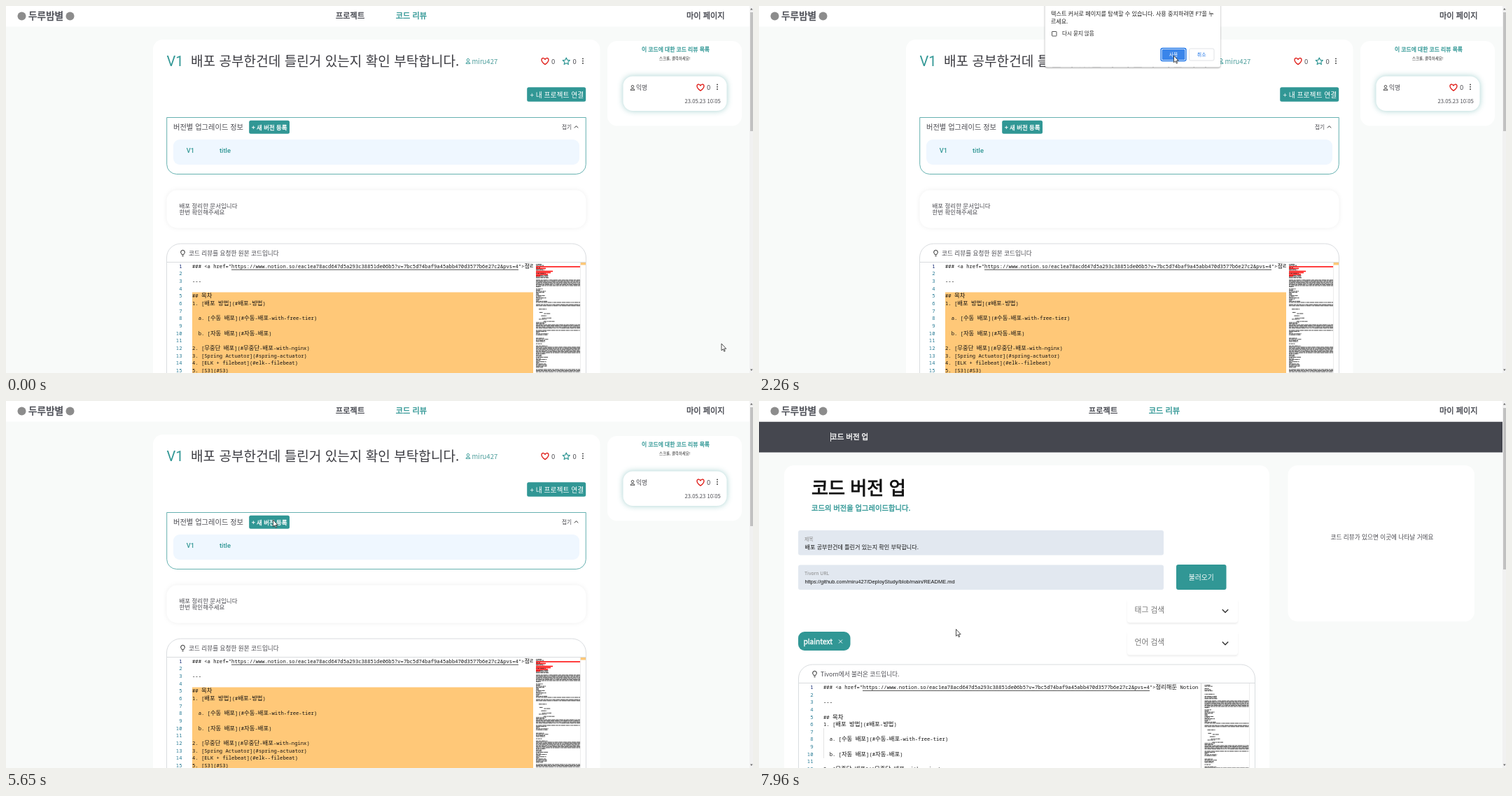
These frames come from a looping animation (1067x525 px, 8 s). An HTML page:

```html
<!DOCTYPE html>
<html lang="ko">
<head>
<meta charset="utf-8">
<style>
html, body { margin: 0; width: 100%; height: 100%; overflow: hidden; background: #f8faf9; }
svg { display: block; font-family: 'Noto Sans CJK KR', 'Noto Sans CJK', 'Noto Sans', sans-serif; }
text { white-space: pre; }
.latin { font-family: Roboto, sans-serif; }
.arial { font-family: 'Liberation Sans', sans-serif; }
.code { font-family: 'Noto Sans Mono', 'Liberation Mono', 'Noto Sans CJK KR', monospace; }
.soft { filter: drop-shadow(0 0 3px #0001); }
.drop { filter: drop-shadow(0 2px 1px #0001); }
.glow { filter: drop-shadow(0 0 4px #31979570); }
.dialog { filter: drop-shadow(0 1px 1px #0006); }
</style>
</head>
<body>
<svg id="stage" width="1067" height="525" viewBox="0 0 1067 525"></svg>
<script>
const TEAL = '#319795', DARK = '#45474f', INK = '#4a4a50', LINK_BLUE = '#1a73e8';
const TITLE = '배포 공부한건데 틀린거 있는지 확인 부탁합니다.';
const USER = 'miru427';

const text = (x, y, size, str, fill = INK, attrs = '') =>
  `<text x="${x}" y="${y}" font-size="${size}" fill="${fill}" ${attrs}>${str}</text>`;
// A thin outline gives a weight between regular and bold
const medium = (x, y, size, str, fill, attrs = '') =>
  text(x, y, size, str, fill, `stroke="${fill}" stroke-width="${size * .035}" ${attrs}`);
const rect = (x, y, w, h, r, fill, attrs = '') =>
  `<rect x="${x}" y="${y}" width="${w}" height="${h}" rx="${r}" fill="${fill}" ${attrs}/>`;
const icon = (x, y, d, color, width = 1) =>
  `<path transform="translate(${x} ${y})" d="${d}" fill="none" stroke="${color}" stroke-width="${width}" stroke-linejoin="round"/>`;

const HEART = 'M0 4.6C-7.5-.5-5-5-2.4-4.4Q-.6-4 0-2.4Q.6-4 2.4-4.4C5-5 7.5-.5 0 4.6Z';
const STAR = 'M0-5L1.5-1.7 5-1.3 2.4 1.1 3.1 4.6 0 2.8-3.1 4.6-2.4 1.1-5-1.3-1.5-1.7Z';
const PERSON = 'M0-3.6A1.8 1.8 0 0 1 0 0A1.8 1.8 0 0 1 0-3.6ZM-3 3.4Q-3 1.2 0 1.2T3 3.4Z';
const BULB = 'M-1.3 2.2C-1.3.8-2.8.5-2.8-1.4A2.8 2.8 0 0 1 2.8-1.4C2.8.5 1.3.8 1.3 2.2ZM-1 4.2H1';
const CHEVRON = 'M-4.2-2L0 2.2L4.2-2';
const dots = (x, y) => [-3.3, 0, 3.3].map(d => `<circle cx="${x}" cy="${y + d}" r=".9" fill="#333"/>`).join('');

const url = 'https://www.notion.so/eac1ea78acd647d5a293c38851de06b5?v=7bc5d74baf9a45abb470d3577b6e27c2&amp;pvs=4';
const lines = [
  `### &lt;a href="${url}"&gt;정리해둔 Notion`, '', '---', '', '## 목차',
  '1. [배포 방법](#배포-방법)', '', '  a. [수동 배포](#수동-배포-with-free-tier)', '',
  '  b. [자동 배포](#자동-배포)', '', '2. [무중단 배포](#무중단-배포-with-nginx)',
  '3. [Spring Actuator](#spring-actuator)', '4. [ELK + filebeat](#elk--filebeat)', '5. [S3](#S3)'
];
const wideHangul = s => s.replace(/[가-힣]+/g, '<tspan font-size="8.4">$&</tspan>');

function codeLines(x, y, right, clip) {
  const rows = lines.map((line, i) => {
    const base = y + i * 10.65;
    return text(x - 14.5, base, 7.2, i + 1, i ? '#237893' : '#0b216f', 'text-anchor="end"') +
      text(x, base, 7.2, wideHangul(line), '#111', `clip-path="url(#${clip})"`);
  });
  return `<clipPath id="${clip}"><rect x="0" y="0" width="${right}" height="525"/></clipPath><g class="code">${rows.join('')}</g>`;
}

// Dense full-width paragraphs alternate with short, partly indented rows
function minimap(x, y) {
  let seed = 11, d = '';
  const random = () => (seed = seed * 16807 % 2147483647) / 2147483647;
  for (let row = 1; y + row < 525; row += 1.6) {
    const wide = (row + 8) % 32 < 10;
    if (random() < (wide ? .15 : .35)) continue;
    const indent = !wide && row > 60 && row < 85 ? 4 + random() * 8 : 0;
    const end = wide ? 63 : indent + 4 + random() * 14;
    for (let at = indent; at < end;) {
      const dash = Math.min(1 + random() * 6, end - at);
      d += `M${(x + at).toFixed(1)} ${(y + row).toFixed(1)}h${dash.toFixed(1)}`;
      at += dash + .6;
    }
  }
  return `<path d="${d}" stroke="#333" stroke-width=".9"/>`;
}

const editor = (x, y, right, label) =>
  `<path d="M${x} 530V${y + 20}a20 20 0 0 1 20-20H${right - 20}a20 20 0 0 1 20 20V530M${x} ${y + 26.5}H${right}" fill="#fff" stroke="#d9dcdf"/>` +
  icon(x + 23, y + 13.5, BULB, '#222') + text(x + 31.5, y + 16.5, 8.65, label);

const scrollbar = (y, h) => rect(1062, 0, 5, 525, 0, '#f1f1f1') + rect(1063, y, 4, h, 0, '#c1c1c1') +
  '<path d="M1063 5.5l1.8-2.5 1.8 2.5zM1063 519.5l1.8 2.5 1.8-2.5z" fill="#666"/>';

const reviewPage =
  rect(210, 48, 638.5, 500, 14, '#fff') + rect(859, 50, 192, 121.5, 14, '#fff') +
  text(229.5, 86, 20, 'V1', TEAL, 'class="latin"') + text(264, 86, 19.1, TITLE, '#3c3c42', 'font-weight="300"') +
  icon(660, 79, PERSON, TEAL, .9) + text(665.5, 82.5, 9.5, USER, '#4f9f9d') +
  icon(770, 79, HEART, '#e0201b', 1.4) + text(779, 82.5, 9.5, '0') +
  icon(800.3, 79, STAR, TEAL, 1.2) + text(809.5, 82.5, 9.5, '0') + dots(824, 78.7) +
  rect(744.2, 116.2, 84, 20.6, 2.5, TEAL) + text(748.5, 130.5, 9.8, '+ 내 프로젝트 연결', '#fff') +
  '<path d="M229.7 159.5H828.3V226.5a14 14 0 0 1-14 14H243.7a14 14 0 0 1-14-14Z" fill="#fff" stroke="#55a9a7" stroke-width=".9"/>' +
  text(239, 176.6, 10.25, '버전별 업그레이드 정보') +
  rect(347.2, 163.7, 57.8, 19, 2.5, TEAL) + medium(351, 176.6, 8.45, '+ 새 버전 등록', '#fff') +
  text(794, 176, 7.7, '접기') + icon(814.5, 173, 'M-2.6 1.4L0-1.4L2.6 1.4', '#333') +
  rect(239, 191, 580, 36, 9, '#eff7ff') +
  text(257.8, 210, 9.2, 'V1', TEAL, 'class="latin" font-weight="500"') +
  text(305, 210, 9.3, 'title', TEAL, 'class="latin" font-weight="500"') +
  rect(229.5, 263.5, 599, 54, 15, '#fff', 'class="soft"') +
  text(247.5, 288.8, 8.5, '배포 정리한 문서입니다') + text(247.5, 297.8, 8.5, '한번 확인해주세요') +
  editor(229.5, 340, 828.5, '코드 리뷰를 요청한 원본 코드입니다') +
  rect(266, 409.5, 487, 120, 0, '#ffc878') + codeLines(266, 374.8, 753, 'reviewClip') +
  '<path d="M322 377.2H732" stroke="#222" stroke-width=".8"/>' +
  minimap(757, 367) +
  '<path d="M757 373H820M757 375.5H771M757 379.5H781M757 381.5H778M757 384H774M757 386H763" stroke="#f00" stroke-width="1.6"/>' +
  rect(820.5, 367, 7.5, 3.5, 0, '#ffc878') + '<path d="M820.5 367V525" stroke="#e4e4e4" stroke-width=".7"/>' +
  medium(908, 65, 7.8, '이 코드에 대한 코드 리뷰 목록', TEAL) + text(933, 77, 5.4, '스크롤, 클릭하세요!', '#222') +
  rect(881.5, 100.5, 148, 49.5, 14, '#fff', 'class="glow"') +
  icon(895, 117, PERSON, '#444', .9) + text(900, 120.2, 8.7, '익명') +
  icon(992, 116.5, HEART, '#e0201b', 1.4) + text(1001, 120, 9.5, '0') + dots(1016, 115.7) +
  text(969.5, 138.8, 7.7, '23.05.23 10:05') + scrollbar(9, 170);

const dropdown = (y, label) => rect(526, y, 158, 34, 4, '#fff', 'class="drop"') +
  text(536.5, y + 20, 10.8, label, '#777') + icon(666, y + 17.2, CHEVRON, '#333', 1.4);

const upgradePage =
  rect(0, 29.5, 1062, 44, 0, DARK) + medium(102, 54.8, 10.5, '코드 버전 업', '#fff') +
  '<path id="caret" d="M102.5 45V58" stroke="#fff" stroke-width=".9"/>' +
  rect(36, 92, 693, 460, 14, '#fff') + rect(755.5, 92, 266.5, 223.5, 14, '#fff') +
  medium(75, 134, 26.1, '코드 버전 업', '#111') +
  medium(75, 156.5, 10.3, '코드의 버전을 업그레이드합니다.', TEAL) +
  rect(56, 185, 522, 35.5, 3, '#e2e8f0') + rect(56, 234.5, 522, 35.5, 3, '#e2e8f0') +
  text(65, 203, 7.6, '제목', '#888', 'id="titleLabel"') + text(65, 253, 7.6, 'Tivorn URL', '#888', 'id="urlLabel"') +
  text(65.5, 212, 8.1, TITLE, '#111') +
  text(65.5, 260.6, 7.5, `https://github.com/${USER}/DeployStudy/blob/main/README.md`, '#111', 'class="arial"') +
  rect(596, 234, 71.5, 36, 3, TEAL) + text(613.8, 256.2, 9.8, '불러오기', '#fff') +
  dropdown(283, '태그 검색') + dropdown(329.3, '언어 검색') +
  rect(56, 330, 74.5, 27, 9, TEAL) + medium(63.5, 347.5, 10.1, 'plaintext', '#fff') +
  icon(116.5, 344, 'M-2.5-2.5L2.5 2.5M2.5-2.5L-2.5 2.5', '#fff', .9) +
  editor(56.5, 377, 708.5, 'Tivorn에서 불러온 코드입니다.') +
  '<path d="M92.5 468V511" stroke="#ddd" stroke-width=".8"/>' +
  codeLines(92, 411.9, 632, 'upgradeClip') + minimap(636.5, 404) +
  '<path id="underline" d="M148 414.4H558" stroke="#222" stroke-width=".8"/>' +
  '<path id="minimapEdge" d="M631.5 404V525" stroke="#ccc" stroke-width=".8"/>' +
  '<path d="M700.5 404V525" stroke="#e4e4e4" stroke-width=".7"/>' + rect(700, 404, 8, 11.5, 0, '#c1c1c1', 'id="slider"') +
  text(769, 112.5, 8.9, 'Loading...', INK, 'id="loading"') +
  text(816.5, 197.5, 8.65, '코드 리뷰가 있으면 이곳에 나타날 거에요', INK, 'id="empty"') +
  scrollbar(10, 231) +
  `<g id="status">${rect(-4, 513, 358, 16, 2, '#dee1e6')}${text(-1, 521.8, 7, 'rough-code.com의 응답을 기다리는 중...', '#5f6368')}</g>`;

const header = rect(0, 0, 1062, 29.5, 0, '#fff') +
  '<circle cx="22.5" cy="14.5" r="6" fill="#8c8c8c"/><circle cx="91.5" cy="14.5" r="6" fill="#8c8c8c"/>' +
  medium(32, 19.2, 13.6, '두루밤별', DARK) +
  medium(471, 18.3, 11.2, '프로젝트', DARK) + medium(556.8, 18.3, 11.2, '코드 리뷰', TEAL) +
  medium(972, 18.3, 11.2, '마이 페이지', DARK);

const dialog = rect(408.5, -10, 250.5, 97.5, 3, '#fff', 'class="dialog"') +
  text(417, 13.8, 8.1, '텍스트 커서로 페이지를 탐색할 수 있습니다. 사용 중지하려면 F7을 누', '#222') +
  text(417, 24.6, 8, '르세요.', '#222') +
  rect(418.5, 36.5, 6.5, 6.5, .5, '#fff', 'stroke="#555"') + text(433, 42.4, 7.5, '다시 묻지 않음', '#222') +
  rect(574, 60.5, 36, 18, 2.5, '#fff', `stroke="${LINK_BLUE}" stroke-width="1.3"`) +
  rect(575.5, 62, 33, 15, 1.5, LINK_BLUE, 'id="accept"') + text(585.7, 72, 6.9, '사용', '#fff') +
  rect(614.5, 61, 35.5, 17, 2, '#fff', 'id="cancel" stroke="#dadce0" stroke-width=".8"') + text(625.8, 72, 6.9, '취소', LINK_BLUE);

document.getElementById('stage').innerHTML =
  `<g id="review">${reviewPage}</g><g id="upgrade">${upgradePage}</g>${header}<g id="dialog">${dialog}</g>` +
  '<path id="cursor" d="M0 0V9.8L2.3 7.8L3.8 11.2L5.2 10.6L3.7 7.3H6.7Z" fill="#fff" stroke="#222" stroke-width=".8"/>';

// Pointer stops: time, x, y
const stops = [
  [70, 1022, 483], [730, 403, 209], [870, 357, 159], [1400, 610, 64], [1680, 630, 72], [1810, 632, 73],
  [1950, 632, 73], [2260, 592.5, 71], [2920, 592.5, 71], [3340, 625, 70], [3600, 625, 70], [3740, 604, 71],
  [3800, 604, 71], [4260, 902, 60], [4530, 902, 60], [5190, 378, 172], [5450, 378, 172], [5650, 381.5, 170],
  [6270, 381.5, 170], [6410, 374.5, 176], [6740, 374.5, 176], [7490, 276, 254], [7960, 281.5, 326.5]
];
const $ = id => document.getElementById(id);
const show = (id, on) => $(id).setAttribute('visibility', on ? 'inherit' : 'hidden');
const clamp = v => Math.max(0, Math.min(1, v));
const within = (t, a, b) => t >= a && t < b;

function pointer(t) {
  const i = stops.findIndex(s => s[0] > t);
  if (i === 0) return stops[0].slice(1);
  if (i < 0) return stops[stops.length - 1].slice(1);
  const [t0, x0, y0] = stops[i - 1], [t1, x1, y1] = stops[i];
  const u = (t - t0) / (t1 - t0), e = u * u * (3 - 2 * u);
  return [x0 + (x1 - x0) * e, y0 + (y1 - y0) * e];
}

function shrinkLabel(id, y, u) {
  $(id).setAttribute('y', y - 3.7 * u);
  $(id).setAttribute('font-size', 7.7 - .9 * u);
}

function render(t) {
  show('review', t < 5730);
  show('upgrade', t >= 5730);
  show('dialog', within(t, 400, 3800));
  $('accept').setAttribute('fill', within(t, 1500, 1740) || within(t, 2000, 2950) ? '#3a85ea' : LINK_BLUE);
  $('cancel').setAttribute('fill', within(t, 1740, 1810) || t >= 2950 ? '#edf3fd' : '#fff');

  const loaded = t >= 5730;
  show('caret', loaded && Math.floor((t - 5680) / 530) % 2 === 0);
  show('loading', within(t, 5730, 5900));
  show('empty', t >= 5900);
  show('underline', t >= 6000);
  show('minimapEdge', t >= 6000);
  show('status', within(t, 5730, 6080));
  show('slider', within(t, 5730, 6150));
  const u = clamp((t - 5800) / 150);
  shrinkLabel('titleLabel', 203.2, u);
  shrinkLabel('urlLabel', 253, u);
  $('cursor').setAttribute('transform', `translate(${pointer(t)})`);
}

const begin = performance.now();
(function tick() {
  render((performance.now() - begin) % 8000);
  requestAnimationFrame(tick);
})();
</script>
</body>
</html>
```
